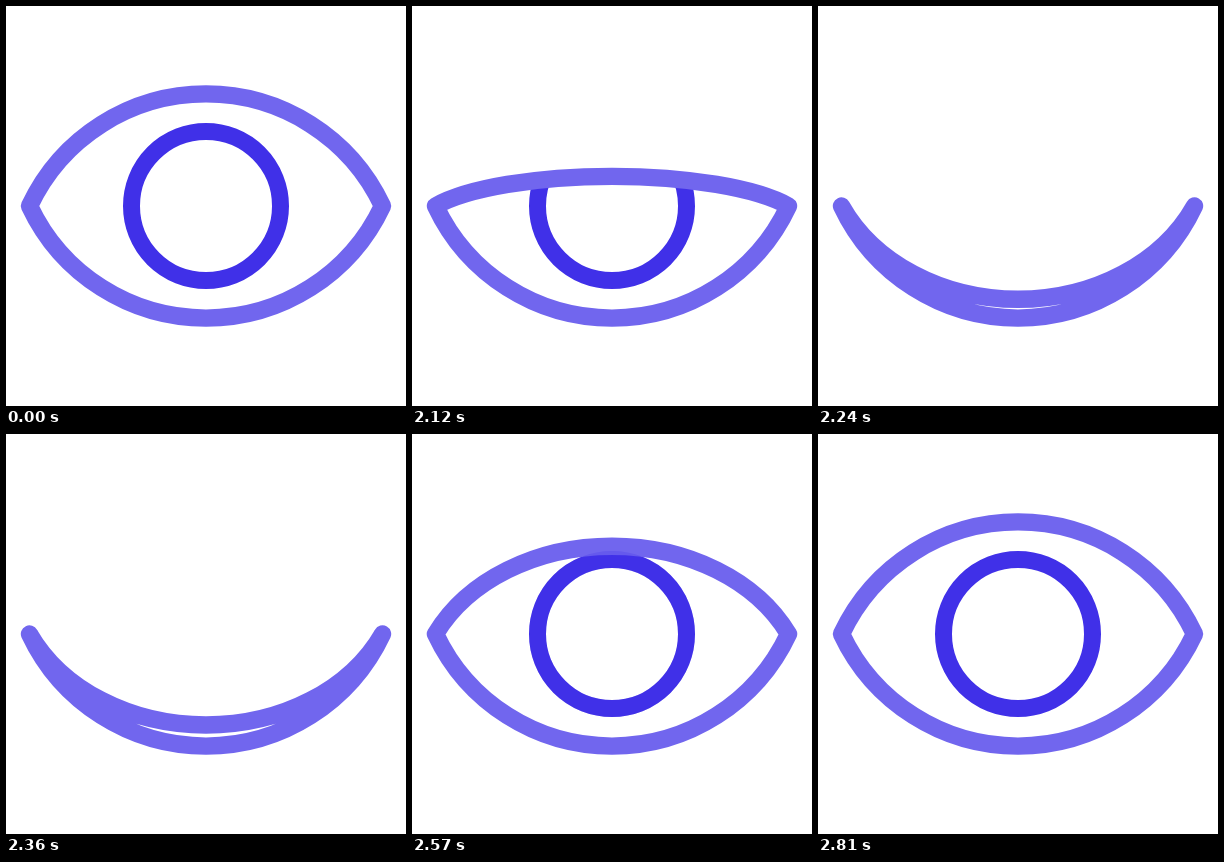
Animation of 400x400 px, one loop 2.84 s. Source, as an HTML page:

```html
<!DOCTYPE html>
<html lang="en">
<head>
<meta charset="utf-8">
<title>Blinking eye</title>
<style>
  html, body { margin: 0; width: 100%; height: 100%; overflow: hidden; background: #fff; }
  svg { display: block; width: 100%; height: 100%; }
</style>
</head>
<body>
<svg viewBox="0 0 400 400">
  <defs>
    <clipPath id="opening"><path class="eye"/></clipPath>
    <circle id="iris" cx="200" cy="200" r="74.5" fill="none" stroke="#4030e8" stroke-width="17"/>
  </defs>
  <g clip-path="url(#opening)"><use href="#iris"/></g>
  <path class="eye" fill="none" stroke="#7166ee" stroke-width="17.4" stroke-linejoin="round"/>
  <g clip-path="url(#opening)"><use id="tint" href="#iris" opacity="0"/></g>
</svg>
<script>
  const LOOP = 2840, STEP = 30;
  const CLOSE = 2000, SHUT = 2292, OPEN = 2810;
  const LEFT = 23.5, RIGHT = 376.5, RADIUS = 195;
  const eyes = document.querySelectorAll('.eye');
  const tint = document.getElementById('tint');

  // Cubic easing with handles (x1, 0) and (x2, 1).
  function ease(x, x1, x2) {
    if (x <= 0) return 0;
    if (x >= 1) return 1;
    let lo = 0, hi = 1;
    for (let i = 0; i < 30; i++) {
      const s = (lo + hi) / 2, r = 1 - s;
      if (3 * r * r * s * x1 + 3 * r * s * s * x2 + s * s * s < x) lo = s;
      else hi = s;
    }
    return lo * lo * (3 - 2 * lo);
  }

  function closedAt(t) {
    return t < SHUT
      ? ease((t - CLOSE) / (SHUT - CLOSE), 1 / 3, 2 / 3)
      : 1 - ease((t - SHUT) / (OPEN - SHUT), 1 / 3, 0);
  }

  function draw(t) {
    const time = CLOSE + Math.floor((t - CLOSE) / STEP) * STEP;
    // 1 is the raised lid, -1 lies on the lower lid.
    const lift = 1 - 2 * closedAt(time);
    const ry = (RADIUS * Math.abs(lift)).toFixed(3);
    const path = `M${LEFT} 200A${RADIUS} ${ry} 0 0 ${lift > 0 ? 1 : 0} ${RIGHT} 200` +
      `A${RADIUS} ${RADIUS} 0 0 1 ${LEFT} 200Z`;
    eyes.forEach(eye => eye.setAttribute('d', path));
    tint.setAttribute('opacity', lift > 0.7 && lift < 0.9 ? 0.25 : 0);
  }

  const start = performance.now();
  function tick() {
    draw((performance.now() - start) % LOOP);
    requestAnimationFrame(tick);
  }
  tick();
</script>
</body>
</html>
```
